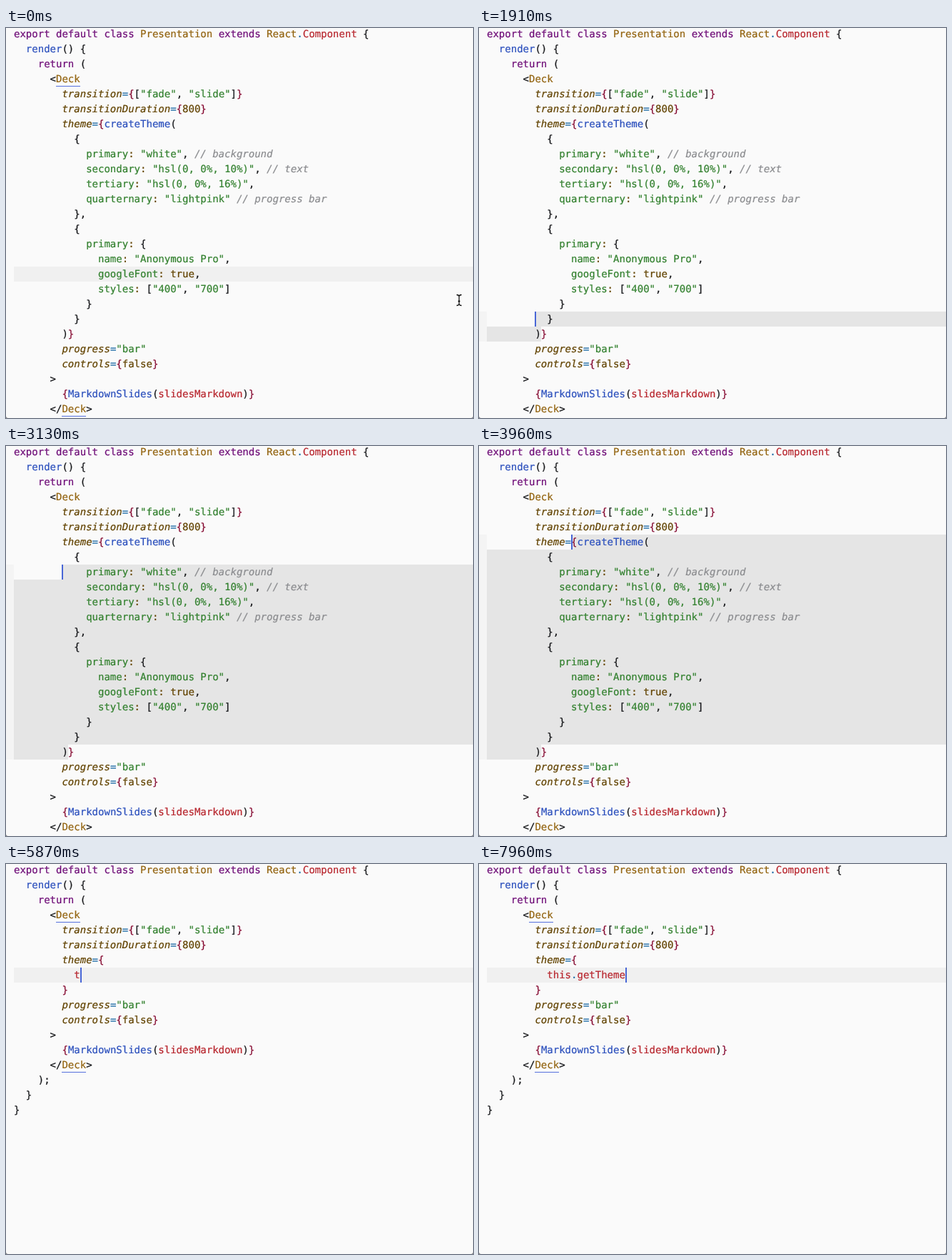
Recreate the animation shown at these times as an HTML page. Size 654x546 px, loop 8 s.

```html
<!DOCTYPE html>
<html lang="en">
<head>
<meta charset="utf-8">
<title>Code editor</title>
<style>
  html, body { margin: 0; width: 100%; height: 100%; overflow: hidden; background: #777; }
  #stage {
    position: relative; width: 654px; height: 546px; overflow: hidden;
    background: #fafafa; border-radius: 0 0 3px 3px; color: #141518;
    font: 14px/21px "DejaVu Sans Mono", Menlo, monospace;
    text-rendering: geometricPrecision; font-variant-ligatures: none;
    -webkit-text-stroke: .22px;
  }
  #stage > div, #stage > svg { position: absolute; }
  #code { left: 11px; top: -1px; white-space: pre; }
  #code div { height: 21px; }
  #marks { left: 0; top: -2px; width: 654px; height: 548px; }
  #marks div { position: absolute; height: 21px; }
  #caret { width: 2px; height: 21px; background: #4967d6; }
  k { color: #6f0d78; } o { color: #936410; } r { color: #b8262e; } f { color: #2c50bd; }
  g { color: #33812f; } n { color: #624300; } j { color: #860b32; } e { color: #1e6ba6; }
  at { color: #624300; font-style: italic; } c { color: #8b8c8f; font-style: italic; }
  .tags u { display: inline-block; height: 19px; border-bottom: 1px solid #5570dc; vertical-align: top; }
  u { text-decoration: none; }
  #popup {
    left: 98px; top: 166px; width: 320px; border-radius: 3px; overflow: hidden;
    background: #fafafa; box-shadow: 0 1px 4px rgba(0,0,0,.45); line-height: 29px;
  }
  #popup div { position: relative; height: 28px; white-space: pre; padding-left: 39px; }
  #popup div:first-child { background: #d9d9d9; }
  #popup svg { position: absolute; left: 0; top: 0; background: rgba(80,161,79,.19); }
  #popup b { color: #000; }
  #popup span { position: absolute; left: 137px; top: -1px; font-size: 12.6px; color: #7d7e82; }
  #popup div:first-child span { color: #5c5d60; }
</style>
</head>
<body>
<div id="stage">
  <div id="marks"></div>
  <div id="code"></div>
  <div id="caret"></div>
  <div id="popup"></div>
  <svg id="mouse" style="left:629px;top:372px" width="11" height="18" fill="none">
    <path d="M2 1.5q3 0 3.5 2q.5-2 3.5-2M2 16.5q3 0 3.5-2q.5 2 3.5 2M5.5 3v12M4 10.5h3" stroke="#fff" stroke-width="3"/>
    <path d="M2 1.5q3 0 3.5 2q.5-2 3.5-2M2 16.5q3 0 3.5-2q.5 2 3.5 2M5.5 3v12M4 10.5h3" stroke="#111" stroke-width="1.3"/>
  </svg>
</div>
<script>
const LOOP = 8000, LINE = 21, LEFT = 11;
const $ = id => document.getElementById(id);
const column = n => `calc(${LEFT}px + ${n}ch)`;

const head = `<k>export</k> <k>default</k> <k>class</k> <o>Presentation</o> <k>extends</k> <o>React</o><e>.</e><r>Component</r> {
  <f>render</f>() {
    <k>return</k> (
      &lt;<o><u>Deck</u></o>
        <at>transition</at><e>=</e><j>{</j>[<g>"fade"</g>, <g>"slide"</g>]<j>}</j>
        <at>transitionDuration</at><e>=</e><j>{</j><n>800</n><j>}</j>
        <at>theme</at><e>=</e><j>{</j>`;

const theme = `<f>createTheme</f>(
          {
            <g>primary<n>:</n> "white"</g>, <c>// background</c>
            <g>secondary<n>:</n> "hsl(0, 0%, 10%)"</g>, <c>// text</c>
            <g>tertiary<n>:</n> "hsl(0, 0%, 16%)"</g>,
            <g>quarternary<n>:</n> "lightpink"</g> <c>// progress bar</c>
          },
          {
            <g>primary<n>:</n></g> {
              <g>name<n>:</n> "Anonymous Pro"</g>,
              <g>googleFont<n>:</n></g> <n>true</n>,
              <g>styles<n>:</n></g> [<g>"400"</g>, <g>"700"</g>]
            }
          }
        )`;

const tail = `<j>}</j>
        <at>progress</at><e>=</e><g>"bar"</g>
        <at>controls</at><e>=</e><j>{</j><n>false</n><j>}</j>
      >
        <j>{</j><f>MarkdownSlides</f>(<r>slidesMarkdown</r>)<j>}</j>
      &lt;/<o><u>Deck</u></o>>
    );
  }
}`;

const ANCHOR = { line: 20, col: 9 };
const steps = [];
const add = (at, state) => steps.push({ at, ...state });

// Walk down to the closing parenthesis.
add(0, { line: 16, col: 31, hidden: true });
[31, 13, 11, 10].forEach((col, i) => add(900 + i * 120, { line: 17 + i, col }));
add(1400, { line: 20, col: 9 });

// Extend the selection upwards, then trim its start.
add(1600, { line: 20, col: 8, selecting: true });
for (let i = 0; i < 14; i++) add(1820 + i * 112, { line: 19 - i, col: 8, selecting: true });
[[3600, 13], [3800, 14], [4060, 15]].forEach(([at, col]) => add(at, { line: 6, col, selecting: true }));

// Delete it, open a new line and type.
add(4400, { line: 6, col: 15, typed: null });
add(4800, { line: 7, col: 10, typed: "" });
add(5220, { line: 7, col: 10, typed: "", hidden: true });
add(5600, { line: 7, col: 10, typed: "" });
const word = "this.getTheme";
[5840, 5960, 6080, 6190, 6320, 6450, 6560, 6670, 6980, 7100, 7220, 7340, 7460].forEach((at, i) =>
  add(at, { line: 7, col: 11 + i, typed: word.slice(0, i + 1), rows: i === 7 ? 5 : i === 8 ? 1 : 0 }));

const arrow = '<svg width="29" height="28"><path d="M8 12.5h5v-3.5l5 5-5 5v-3.5H8zM19.5 9.5h2v9h-2z" fill="#50a14f"/></svg>';
const snippets = [["", "sByClassName"], ["i", "ById"], ["n", "sByName"], ["t", "sByTagName"]];

function popupRows(count) {
  if (count === 1) return `<div>${arrow}<b>gett</b><span>getElementsByTagName</span></div>`;
  return snippets.map(([key, end]) =>
    `<div>${arrow}<b>get</b>${key}<span>getElement${end}</span></div>`).join("") +
    "<div><b>g</b>oogl<b>e</b>Fon<b>t</b></div>";
}

function source({ typed }) {
  if (typed === undefined) return head + theme + tail;
  if (typed === null) return head + tail;
  const text = typed.split(".").map(s => `<r>${s}</r>`).join("<e>.</e>");
  return `${head}\n          ${text}\n        ${tail}`;
}

function band(line, left, right, color) {
  return `<div style="top:${line * LINE}px;left:${left};width:calc(${right} - ${left});background:${color}"></div>`;
}

function marks({ line, col, selecting }) {
  if (!selecting) return band(line, LEFT + "px", "654px", "#f0f0f0");
  let html = "";
  for (let i = line; i <= ANCHOR.line; i++) {
    html += band(i, "0px", LEFT + "px", "#f4f4f4");
    html += band(i, i === line ? column(col) : LEFT + "px",
      i === ANCHOR.line ? column(ANCHOR.col) : "654px", "#e5e5e5");
  }
  return html;
}

let shown;
function show(step) {
  if (step === shown) return;
  shown = step;
  $("code").innerHTML = source(step).split("\n").map(s => `<div>${s}</div>`).join("");
  $("code").className = step.selecting ? "" : "tags";
  $("marks").innerHTML = marks(step);
  $("caret").style.cssText =
    `left:${column(step.col)};top:${step.line * LINE - 2}px;opacity:${step.hidden ? 0 : 1}`;
  $("popup").style.display = step.rows ? "" : "none";
  $("popup").innerHTML = step.rows ? popupRows(step.rows) : "";
}

const start = performance.now();
function frame() {
  const t = (performance.now() - start) % LOOP;
  show(steps.findLast(s => s.at <= t) || steps[0]);
  $("mouse").style.display = t < 780 ? "" : "none";
  requestAnimationFrame(frame);
}
frame();
</script>
</body>
</html>
```
